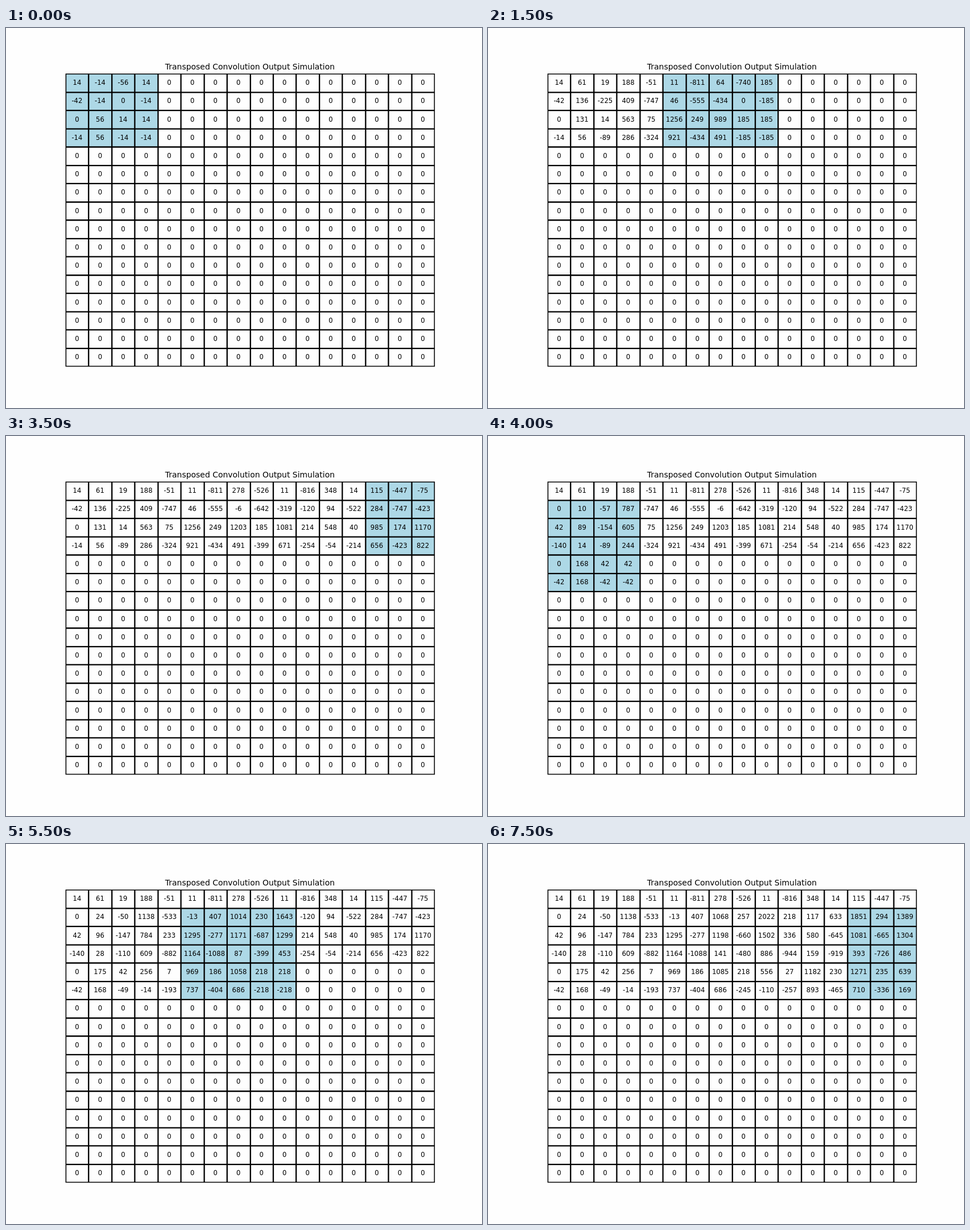
An HTML page with a canvas that plays this animation: 837 by 669 pixels, repeating every 8 s.

```html
<!DOCTYPE html>
<html lang="en">
<head>
<meta charset="utf-8">
<title>Transposed Convolution Output Simulation</title>
<style>
  html, body { margin: 0; width: 100%; height: 100%; overflow: hidden; background: #fefefe; }
  canvas { display: block; }
</style>
</head>
<body>
<canvas id="stage" width="837" height="669"></canvas>
<script>
const N = 16, STRIDE = 2, PAD = 1, STEP_MS = 500;
const KERNEL = [
  [2, 1, -3, 4, 9],
  [1, 1, -1, -4, 1],
  [2, -3, -1, 0, -1],
  [1, 0, 4, 1, 1],
  [0, -1, 4, -1, -1],
];
const INPUT = [
  [14, 75, 249, 185, 214, 40, 174, 249],
  [42, 7, 186, 218, 27, 230, 235, 101],
];
const PER_ROW = INPUT[0].length, STEPS = INPUT.length * PER_ROW;

// Layout in a 1000 x 800 figure, scaled down to the stage
const LEFT = 125, TOP = 96, CELL_W = 775 / N, CELL_H = 616 / N, LINE = 2.78;
const FONT = '"DejaVu Sans", sans-serif';
const snap = v => Math.floor(v + 0.5) + 0.5;
const edgeX = c => snap(LEFT + c * CELL_W);
const edgeY = r => snap(TOP + r * CELL_H);
const ctx = document.getElementById('stage').getContext('2d');

// Calls visit(row, col, weight) for each output cell the kernel covers
function eachCovered(step, visit) {
  const top = Math.floor(step / PER_ROW) * STRIDE - PAD;
  const left = step % PER_ROW * STRIDE - PAD;
  KERNEL.forEach((line, i) => line.forEach((weight, j) => {
    const r = top + i, c = left + j;
    if (r >= 0 && r < N && c >= 0 && c < N) visit(r, c, weight);
  }));
}

function outputAfter(step) {
  const out = Array.from({ length: N }, () => Array(N).fill(0));
  for (let s = 0; s <= step; s++) {
    const x = INPUT[Math.floor(s / PER_ROW)][s % PER_ROW];
    eachCovered(s, (r, c, weight) => { out[r][c] += x * weight; });
  }
  return out;
}

function drawGrid() {
  ctx.save();
  ctx.beginPath();
  ctx.rect(LEFT, TOP, 776, 617);
  ctx.clip();
  ctx.beginPath();
  for (let k = 0; k <= N; k++) {
    ctx.moveTo(edgeX(k), 0);
    ctx.lineTo(edgeX(k), 800);
    ctx.moveTo(0, edgeY(k));
    ctx.lineTo(1000, edgeY(k));
  }
  ctx.lineWidth = LINE;
  ctx.strokeStyle = '#000';
  ctx.stroke();
  ctx.restore();
}

function draw(step) {
  ctx.setTransform(1, 0, 0, 1, 0, 0);
  ctx.fillStyle = '#fefefe';
  ctx.fillRect(0, 0, 837, 669);
  ctx.scale(837 / 1000, 669 / 800);

  ctx.fillStyle = '#add8e6';
  eachCovered(step, (r, c) => ctx.fillRect(
    edgeX(c), edgeY(r), edgeX(c + 1) - edgeX(c), edgeY(r + 1) - edgeY(r)));
  drawGrid();

  ctx.fillStyle = '#000';
  ctx.textAlign = 'center';
  ctx.font = `16.67px ${FONT}`;
  ctx.fillText('Transposed Convolution Output Simulation', 512.5, 87.7);
  ctx.font = `13.89px ${FONT}`;
  outputAfter(step).forEach((line, r) => line.forEach((value, c) =>
    ctx.fillText(value, LEFT + (c + 0.5) * CELL_W, TOP + (r + 0.5) * CELL_H + 4.6)));
}

let shown = -1;
const start = performance.now();
function tick() {
  const step = Math.floor((performance.now() - start) / STEP_MS) % STEPS;
  if (step !== shown) draw(shown = step);
  requestAnimationFrame(tick);
}
tick();
</script>
</body>
</html>
```
